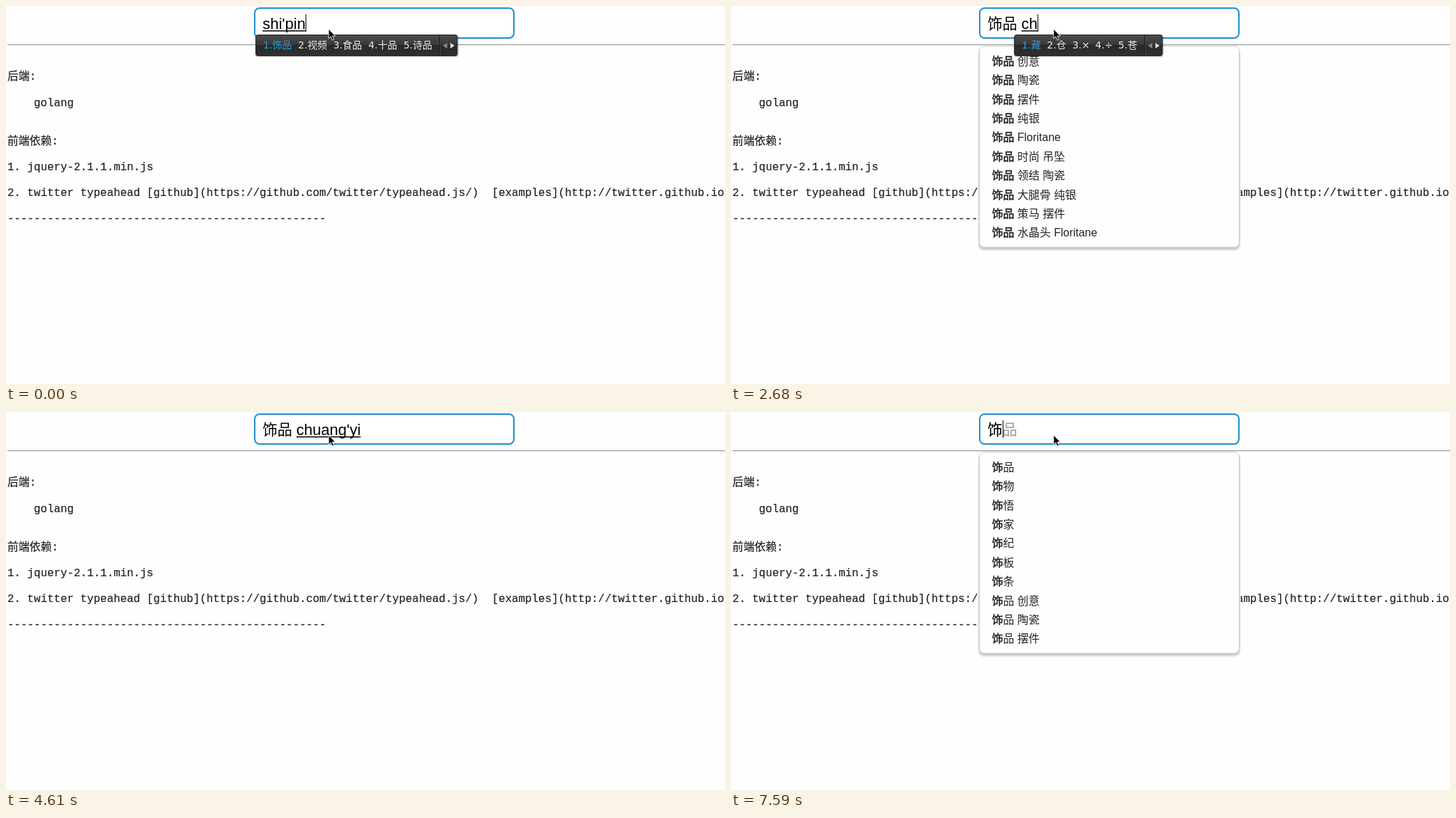
An HTML page for the animation above (8000 ms loop, 1032 px wide and 543 px high).

```html
<!DOCTYPE html>
<html lang="zh-CN">
<head>
<meta charset="utf-8">
<title>Typeahead</title>
<style>
  html, body { margin: 0; width: 100%; height: 100%; overflow: hidden; background: #fefefe; }
  svg { display: block; width: 100%; height: 100%; }
  text { white-space: pre; }
  .page { font: 15.88px "Liberation Mono", "Noto Sans CJK SC", "Noto Sans CJK", monospace; fill: #222; stroke: #222; stroke-width: .2; }
  .field { font: 21.3px "Noto Sans CJK SC", "Noto Sans CJK", sans-serif; fill: #000; }
  .hint { fill: #999; }
  .comp { font: 22px "Liberation Sans", Arial, sans-serif; }
  .item { font: 16px "Liberation Sans", "Noto Sans CJK SC", "Noto Sans CJK", sans-serif; fill: #222; }
  .match { stroke: #222; stroke-width: .5; }
  .cand { font: 14px "DejaVu Sans", "Noto Sans CJK SC", "Noto Sans CJK", sans-serif; fill: #eee; }
  .cand.first { fill: #28a0dc; }
</style>
</head>
<body>
<svg viewBox="0 0 1032 543" xmlns="http://www.w3.org/2000/svg">
  <defs>
    <linearGradient id="dark" x1="0" y1="0" x2="0" y2="1">
      <stop offset="0" stop-color="#4c4c4c"/>
      <stop offset=".48" stop-color="#383838"/>
      <stop offset=".5" stop-color="#292929"/>
      <stop offset="1" stop-color="#303030"/>
    </linearGradient>
  </defs>
  <rect width="1032" height="543" fill="#fefefe"/>
  <rect x="2" y="55" width="1030" height="1" fill="#999"/>
  <rect x="2" y="56" width="1030" height="1" fill="#e8e8e8"/>
  <g class="page" id="page"></g>
  <rect x="357" y="3" width="372" height="43" rx="7" fill="#fff" stroke="#1c8fcf" stroke-width="2"/>
  <g id="menu"></g>
  <g id="field"></g>
  <g id="ime"></g>
  <path d="M463 33.2v13.6l3.1-2.9 2.4 5.2 2.2-1-2.3-5h4.3z" fill="#000" stroke="#fff" stroke-width=".9"/>
</svg>
<script>
const LOOP = 8000;
const ROW = 27.4;
const TEXT_X = 368.2;
const el = id => document.getElementById(id);
const words = s => s.split(',');
const text = (x, y, cls, body) => `<text x="${x}" y="${y}" class="${cls}">${body}</text>`;

const paired = words('饰品 创意,饰品 陶瓷,饰品 摆件,饰品 纯银,饰品 Floritane,饰品 时尚 吊坠,饰品 领结 陶瓷,饰品 大腿骨 纯银,饰品 策马 摆件');
const full = ['饰品', ...paired];
const spaced = [...paired, '饰品 水晶头 Floritane'];
const short = [...words('饰品,饰物,饰悟,饰家,饰纪,饰板,饰条'), ...paired.slice(0, 3)];
const single = ['饰品 创意'];

// Each entry holds the complete state from time t on.
const S = '饰品 ';
const typing = (t, comp, cands, list) => ({ t, value: S, comp, cands: words(cands), list, match: S });
const shown = (t, value, list, more) => ({ t, value, list, match: value, ...more });
const first = { t: 0, value: '', comp: "shi'pin", cands: words('饰品,视频,食品,十品,诗品') };
const states = [
  first,
  { ...first, t: 450, off: true },
  shown(750, '饰品', full),
  shown(1200, '饰品', full, { off: true }),
  shown(1800, '饰品', full),
  shown(1940, S, spaced),
  shown(2090, S, spaced, { hint: '饰品 创意' }),
  typing(2390, 'c', '从,才,此,次,曾', spaced),
  typing(2530, 'c', '才,从,×,÷,次', spaced),
  typing(2680, 'ch', '藏,仓,×,÷,苍', spaced),
  typing(2830, 'chu', '出,处,除,楚,初', spaced),
  typing(2980, 'chua', '欻,出啊,初啊,除啊,处啊', spaced),
  typing(3130, 'chuang', '创,床,窗,闯,疮', spaced),
  typing(3420, 'chuang', '创,床,窗,闯,疮'),
  typing(3870, "chuang'", '窗,创业,创意,床,闯'),
  typing(4010, "chuang'y", '创业,创意,床沿,窗,闯'),
  typing(4160, "chuang'yi", '创意,创议,创艺,床椅,窗衣'),
  { t: 4610, value: S, comp: "chuang'yi", off: true },
  shown(4760, '饰品 创意', single),
  shown(5210, '饰品 创意', single, { off: true }),
  shown(5650, '饰品 创', single, { hint: '饰品 创意' }),
  shown(6100, S, spaced, { hint: '饰品 创意' }),
  shown(6700, '饰品', full),
  shown(7140, '饰品', full, { off: true }),
  shown(7590, '饰', short, { hint: '饰品' })
];

el('page').innerHTML = [
  [2, 106, '后端:'],
  [40.1, 143.5, 'golang'],
  [2, 198.5, '前端依赖:'],
  [2, 236, '1. jquery-2.1.1.min.js'],
  [2, 273, '2. twitter typeahead [github](https://github.com/twitter/typeahead.js/)  [examples](http://twitter.github.io'],
  [2, 310, '-'.repeat(48)]
].map(([x, y, s]) => text(x, y, '', s)).join('');

// Committed text: full-width glyphs plus narrow spaces.
const valueWidth = s => [...s].reduce((w, c) => w + (c === ' ' ? 6 : 21.3), 0);

function valueText(s, cls) {
  let x = TEXT_X;
  return s.split(' ').map(part => {
    const out = text(x, 33, cls, part);
    x += valueWidth(part + ' ');
    return out;
  }).join('');
}

function drawField({ value, comp, hint, off }) {
  let x = TEXT_X + valueWidth(value);
  const field = el('field');
  field.innerHTML = (hint ? valueText(hint, 'field hint') : '') + valueText(value, 'field') +
    (comp ? text(x, 33, 'comp', comp) : '');
  let extra = '';
  if (comp) {
    const w = field.lastChild.getComputedTextLength();
    extra = `<rect x="${x}" y="35" width="${w}" height="1.5"/>`;
    x += w;
  }
  if (!off) extra += `<rect x="${Math.round(x)}" y="12" width="1" height="25"/>`;
  field.insertAdjacentHTML('beforeend', extra);
}

function drawMenu({ list, match }) {
  if (!list) return '';
  const h = list.length * ROW + 16;
  const layer = (x, y, w, height, fill) =>
    `<rect x="${x}" y="${y}" width="${w}" height="${height}" rx="8" fill="${fill}"/>`;
  const rows = list.map((s, i) => text(374.5, 84.8 + i * ROW, 'item',
    `<tspan class="match">${s.slice(0, match.length)}</tspan>${s.slice(match.length)}`));
  return layer(354.5, 60, 377, h + 2, '#ececec') + layer(355.5, 59, 375, h + 1, '#cfcfcf') +
    `<rect x="356.5" y="57.5" width="373" height="${h - 1}" rx="7" fill="#fefefe" stroke="#ccc"/>` +
    rows.join('');
}

function drawIme({ cands, value }) {
  if (!cands) return '';
  const start = value ? 417.3 : 369;
  const left = start - 11;
  let x = start;
  const labels = cands.map((c, i) => {
    const out = text(x, 61.2, i ? 'cand' : 'cand first', `${i + 1}.${c}`);
    x += 22.25 + (/[×÷]/.test(c) ? 10.7 : 14.05 * c.length);
    return out;
  }).join('');
  const w = x + 27.5 - left;
  const arrow = (ax, dir, fill) => `<path d="M${ax} 53v8l${dir * 6}-4z" fill="${fill}"/>`;
  return `<rect x="${left}" y="42" width="${w + 1.5}" height="31.5" rx="4" opacity=".18"/>` +
    `<rect x="${left + .5}" y="41.5" width="${w - 1}" height="30" rx="3" fill="url(#dark)" stroke="#222"/>` +
    `<rect x="${x + 1}" y="42" width="1" height="29" fill="#161616"/>` +
    `<rect x="${x + 2}" y="42" width="1" height="29" fill="#484848"/>` +
    labels + arrow(x + 12.5, -1, '#8a8a8a') + arrow(x + 17, 1, '#ddd');
}

let current;
function draw(time) {
  const state = states.findLast(s => s.t <= time);
  if (state === current) return;
  current = state;
  el('menu').innerHTML = drawMenu(state);
  el('ime').innerHTML = drawIme(state);
  drawField(state);
}

const began = performance.now();
function tick() {
  draw((performance.now() - began) % LOOP);
  requestAnimationFrame(tick);
}
tick();
</script>
</body>
</html>
```
